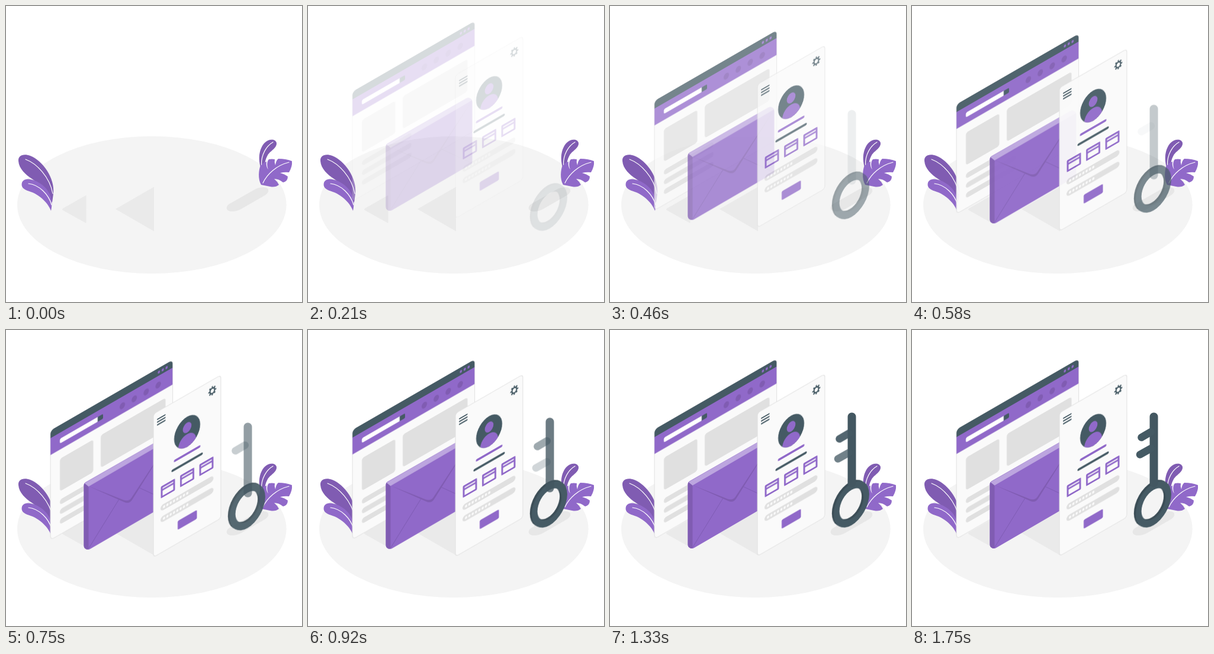
Animation of 500 by 500 pixels, one loop 1.83 s. Source, as an HTML page:

```html
<!DOCTYPE html>
<html lang="en">
<head>
<meta charset="utf-8">
<title>Isometric sign-in</title>
<style>
  html, body { margin: 0; width: 100%; height: 100%; overflow: hidden; background: #fff; }
  svg { display: block; width: 100%; height: 100%; }
  .purple { fill: #9069c9; }
  .plum { fill: #805cb2; }
  .slate { fill: #455a64; }
  .grey { fill: #e0e0e0; }
  .paper { fill: #fafafa; }
  .sheet { fill: #fafafa; stroke: #e0e0e0; }
  .line { fill: none; stroke-linecap: round; stroke-linejoin: round; }
  .vein { fill: none; stroke: #fff; stroke-width: 1.2; stroke-linecap: round; }
</style>
</head>
<body>
<svg viewBox="0 0 500 500">
  <defs>
    <clipPath id="avatarClip"><ellipse cx="57" cy="63" rx="22" ry="25.4"/></clipPath>
    <clipPath id="headerClip"><rect width="206.5" height="185" rx="6"/></clipPath>
    <path id="hoop" fill-rule="evenodd" d="M-30 0A30 35.500 0 1 1 30 0A30 35.500 0 1 1 -30 0ZM-20.500 0A20.500 24.300 0 1 0 20.500 0A20.500 24.300 0 1 0 -20.500 0Z"/>
  </defs>

  <ellipse cx="246.3" cy="336" rx="227.3" ry="116" fill="#f4f4f4"/>
  <g fill="#eaeaea">
    <path d="M96 342L135.500 319.500V367L96 345Q94 343.500 96 342Z"/>
    <path d="M185 343L250 305.500V380.500Z"/>
    <path fill="#e7e7e7" d="M377 334.500L421 309.500C428 306 438 305 442 308.500C445 312 442 317 437 320L397 343C389 347.500 379 348.500 374.500 345C371 342 373 337 377 334.500Z"/>
  </g>

  <path class="plum" d="M21 262C20 252 30 249 41 253C62 261 83 291 80 317L78 332C70 312 52 298 44 292C33 285 22 275 21 262Z"/>
  <path class="purple" d="M26.500 301C27 292 37 291 46 294C64 300 83 318 76 346C70 330 54 318 42 314C33 311 26 308 26.500 301Z"/>
  <path class="vein" d="M33 259C52 266 74 289 79 317M38 300C56 302 72 318 77 336"/>

  <path class="plum" d="M430 272C425 255 429 239 437 231C444 224 455 224 457 231C458 240 447 244 442 252C438 259 437 266 436 274Z"/>
  <path class="purple" d="M431 302C425 292 427 276 430 269Q435 264 440 263C439 269 441 274 443 276C440 269 441 262 444 259Q449 258 454 259Q453 264 455 269Q456 261 460 258Q473 258 483 262Q484 271 478 281Q471 280 463 282Q471 284 476 288Q476 296 468 298Q461 292 453 292Q458 296 461 302Q455 307 446 305Z"/>
  <path class="vein" d="M431.500 268C431 251 440 236 451 230M434 299C441 284 457 269 478 264"/>

  <g id="browser">
    <g id="browserFace" transform="translate(75 168) skewY(-30)">
      <rect class="sheet" width="206.5" height="185" rx="6"/>
      <g clip-path="url(#headerClip)">
        <rect class="slate" width="206.5" height="13.500"/>
        <rect class="purple" y="13" width="206.5" height="28.500"/>
      </g>
      <path fill="#fff" d="M80 23.200H18.500Q16 23.200 16 26V28.500Q16 31.200 18.500 31.200H80Z"/>
      <path class="slate" d="M80 23.200H87.500Q89 23.200 89 25V29.500Q89 31.200 87.500 31.200H80Z"/>
      <rect class="grey" x="16" y="57" width="56.500" height="55" rx="4"/>
      <rect class="grey" x="85" y="57" width="109.500" height="55" rx="4"/>
    </g>
  </g>

  <g id="envelope">
    <path class="purple" d="M131.500 260Q131.500 257 134 255.500L267 179.500Q271 177.500 275 180Q277.500 181.500 277.500 186V286Q277.500 289 274.500 291L143 367.500Q138 370.500 134 367.500Q131.500 366 131.500 362Z"/>
    <path class="plum" d="M131.500 260V362Q131.500 366 134 367.500Q136.500 369.500 139.500 368.500V264Q139 261 132.500 257Z"/>
    <path fill="#bca5df" d="M132.500 257L267 179.500Q271 177.500 275 180L277 182.500L139.500 262.500Z"/>
    <path class="line" stroke="#7f5cb4" d="M140 366.500L191 284M226 265L277 288.500"/>
    <path class="plum" d="M139.500 262L199 285.500Q208 288 212 281.500L277 183L213 285Q208 293 199 288.500Z"/>
  </g>

  <g id="card">
    <g id="cardFace" transform="translate(249 140) skewY(-30)">
      <rect class="sheet" width="114" height="242" rx="5"/>
      <path class="line" stroke="#455a64" stroke-width="2.200" d="M7 13H19.500M7 17.700H19.500M7 22.400H19.500"/>
      <g transform="translate(99.500 18.300) scale(.866 1)" fill="none" stroke="#455a64" stroke-width="2.400">
        <circle r="4.600"/>
        <circle r="6.500" pathLength="80" stroke-dasharray="5 5" stroke-dashoffset="2.500"/>
      </g>
      <ellipse class="slate" cx="57" cy="63" rx="22" ry="25.4"/>
      <g class="purple" clip-path="url(#avatarClip)">
        <ellipse cx="57" cy="56" rx="7.300" ry="8.400"/>
        <path d="M42 92V84C42 73 49 67 57 67S72 73 72 84V92Z"/>
      </g>
      <path class="line" stroke="#9069c9" stroke-width="4" d="M36.500 100H77.500"/>
      <path class="line" stroke="#455a64" stroke-width="4" d="M32.500 114.500H81.500"/>
      <rect class="purple" x="41" y="204.500" width="32.500" height="15" rx="2"/>
    </g>
  </g>

  <g id="ring">
    <g transform="translate(408 294.300) skewY(-30)">
      <use href="#hoop" x="-3.300" y="-3.800" fill="#3b4d56"/>
      <use href="#hoop" class="slate"/>
    </g>
  </g>
  <rect id="stem" x="401.500" y="139.500" width="14" height="126" rx="7" fill="#435761"/>
  <path id="upperTooth" class="line" stroke="#455a64" stroke-width="12.600" d="M387.500 181.500L403.700 172"/>
  <path id="lowerTooth" class="line" stroke="#455a64" stroke-width="12.600" d="M385 210.500L403.700 200"/>
</svg>
<script>
const byId = id => document.getElementById(id);

function add(parent, tag, attrs) {
  const node = document.createElementNS('http://www.w3.org/2000/svg', tag);
  for (const key in attrs) node.setAttribute(key, attrs[key]);
  byId(parent).append(node);
}
const bar = (parent, cls, x, y, width, height, rx) =>
  add(parent, 'rect', { class: cls, x, y, width, height, rx });
const dot = (parent, cls, cx, cy, rx) =>
  add(parent, 'ellipse', { class: cls, cx, cy, rx, ry: rx / 0.866 });

for (let i = 0; i < 4; i++) dot('browserFace', 'plum', 121.5 + i * 20.2, 28.3, 4.6);
for (let i = 0; i < 3; i++) {
  dot('browserFace', 'purple', 183.3 + i * 6.5, 7.1, 2);
  bar('browserFace', 'grey', 16, 126 + i * 16.5, 84, 9, 4.5);

  const x = 12.5 + i * 32.5;
  bar('cardFace', 'purple', x, 130, 24, 20, 1.5);
  bar('cardFace', 'paper', x + 3, 133.6, 18, 2, 0.5);
  bar('cardFace', 'paper', x + 3, 138.5, 18, 8.5, 0.5);
}
for (const y of [167, 186.5]) {
  bar('cardFace', 'grey', 12, y - 5, 89.5, 10, 5);
  for (let i = 0; i < 8; i++) dot('cardFace', 'paper', 18 + i * 5.6, y, 1.9);
}

const LOOP = 1830, FPS = 24;
const DROP = 'cubic-bezier(.36,-.01,.5,1.38)';

// id, start offset in px, delay, duration, easing
const parts = [
  ['browser', -30, 0, 1000, DROP],
  ['envelope', -30, 0, 1000, DROP],
  ['card', -30, 0, 1000, DROP],
  ['ring', 53, 0, 1000, 'ease-in-out'],
  ['stem', 40, 450, 850, 'ease-out'],
  ['upperTooth', 32, 600, 1000, 'ease-out'],
  ['lowerTooth', 30, 800, 1000, 'ease-out'],
].map(([id, from, delay, duration, easing]) => {
  const anim = byId(id).animate([
    { opacity: 0, transform: `translateY(${from}px)` },
    { opacity: 1, transform: 'translateY(0px)' },
  ], { delay, duration, easing, fill: 'both' });
  anim.pause();
  return anim;
});

// Poses advance at 24 per second, with starts rounded to 10 ms.
function show(time) {
  const tick = Math.floor(time / 10) * 10 + 4.9;
  const step = Math.floor(tick * FPS / 1000);
  const pose = step < 3 ? 0 : (step + 1) * 1000 / FPS;
  for (const anim of parts) anim.currentTime = pose;
}

const start = performance.now();
function frame() {
  show((performance.now() - start) % LOOP);
  requestAnimationFrame(frame);
}
show(0);
requestAnimationFrame(frame);
</script>
</body>
</html>
```
